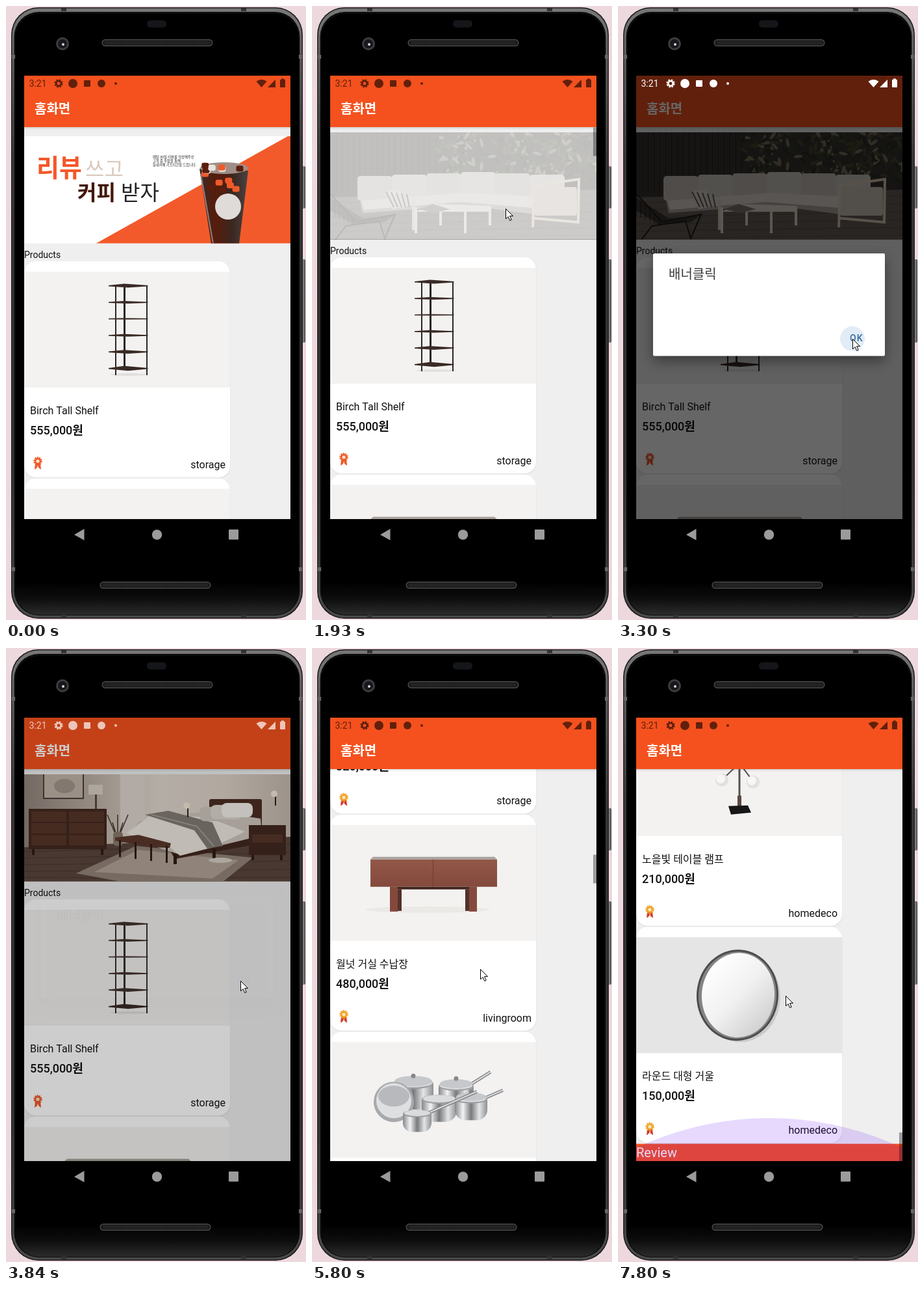
Recreate the animation shown at these times as an HTML page with a canvas. Size 462 by 943 pixels, loop 8 s.

```html
<!DOCTYPE html>
<html lang="ko">
<head>
<meta charset="utf-8">
<style>
html, body { margin: 0; width: 100%; height: 100%; overflow: hidden; background: #ecd8dd; }
canvas { display: block; }
</style>
</head>
<body>
<canvas id="stage" width="462" height="943"></canvas>
<script>
const c = document.getElementById('stage').getContext('2d');
const FONT = 'Roboto, "Noto Sans CJK KR", "Noto Sans CJK", sans-serif';
const LOOP = 8000, ORANGE = '#f4511e', PAGE = '#efefef', PITCH = 333.4, LINE = 19;

// ---- drawing helpers
function rect(x, y, w, h, color, radius = 0) {
  c.fillStyle = color;
  c.beginPath();
  c.roundRect(x, y, w, h, radius);
  c.fill();
}
function oval(x, y, rx, ry, color, angle = 0) {
  c.fillStyle = color;
  c.beginPath();
  c.ellipse(x, y, rx, ry, angle, 0, 7);
  c.fill();
}
const disc = (x, y, r, color) => oval(x, y, r, r, color);
function ring(x, y, r, width, color, dash = []) {
  c.strokeStyle = color;
  c.lineWidth = width;
  c.setLineDash(dash);
  c.beginPath();
  c.arc(x, y, r, 0, 2 * Math.PI);
  c.stroke();
  c.setLineDash([]);
}
function trace(pts) {
  c.beginPath();
  for (let i = 0; i < pts.length; i += 2) c.lineTo(pts[i], pts[i + 1]);
}
function poly(color, ...pts) { trace(pts); c.fillStyle = color; c.fill(); }
function line(color, width, ...pts) {
  trace(pts);
  c.strokeStyle = color;
  c.lineWidth = width;
  c.stroke();
}
function text(str, x, y, size, color = '#111', weight = 400, align = 'left') {
  c.font = `${weight} ${size}px ${FONT}`;
  c.textAlign = align;
  c.fillStyle = color;
  c.fillText(str, x, y);
  return c.measureText(str).width;
}
function fade(x0, y0, x1, y1, ...colors) {
  const g = c.createLinearGradient(x0, y0, x1, y1);
  colors.forEach((col, i) => g.addColorStop(i / (colors.length - 1), col));
  return g;
}
function group(x, y, draw) { c.save(); c.translate(x, y); draw(); c.restore(); }
function clip(x, y, w, h) { c.beginPath(); c.rect(x, y, w, h); c.clip(); }
function repeat(n, draw) { for (let i = 0; i < n; i++) draw(i); }
const noise = i => Math.abs(Math.sin(i * 12.9898) * 43758.5453) % 1;

// ---- motion
const ramp = (t, a, b) => Math.min(1, Math.max(0, (t - a) / (b - a)));
const ease = (t, a, b) => { const k = ramp(t, a, b); return k * k * (3 - 2 * k); };

// The list repaints only now and then: a short drag, then one long fling.
const REPAINTS = [0, 1930, 4740, 4920, 5270, 5470, 5670, 5800, 6070];
const MAX_SCROLL = 7651, NUDGE = 6, DRAG = 134;
function scrollAt(time) {
  const t = time < 6400 ? REPAINTS.findLast(start => start <= time) : time - time % 200;
  const drag = 1 - Math.exp(-Math.max(0, t - 4690) / 160);
  const left = 1 - ramp(t, 5560, 7600);
  return (t >= 1930) * NUDGE + DRAG * drag + (MAX_SCROLL - NUDGE - DRAG) * (1 - left * left);
}
const MOVES = [[700, 1400, -150, -620], [2450, 3020, 63, 200], [4120, 4320, -102, -18], [7200, 7500, -1, 41]];
function cursorAt(t) {
  return MOVES.reduce(([x, y], [a, b, dx, dy]) => {
    const k = ease(t, a, b);
    return [x + dx * k, y + dy * k];
  }, [448, 931]);
}

// ---- banner pages, each 410 x 165
function coffeePage() {
  rect(0, 0, 410, 165, '#fff');
  poly('#f35a2b', 110, 165, 406, 0, 410, 0, 410, 165);
  text('리뷰', 19, 62, 38, '#f4582a', 800);
  text('쓰고', 94, 62, 32, '#dac9bd', 300);
  text('커피', 82, 98, 32, '#43180a', 800);
  text('받자', 149, 98, 32, '#222', 300);
  ['매달 30일 리뷰를 작성해주신', '고객 중 추첨을 통해', '동네카페 기프티콘을 드립니다.']
    .forEach((s, i) => text(s, 198, 34 + i * 6.2, 5.3, '#222'));
  poly(fade(270, 0, 345, 0, '#3a2a26', '#571c0b', '#3b2620', '#4a4340'), 270, 50, 345, 53, 331, 165, 288, 165);
  oval(308, 49, 37, 9, '#a08e86');
  repeat(16, i => {
    const x = 273 + noise(i) * 58, y = 40 + noise(i + 50) * 45;
    rect(x, y, 11, 9, ['#ee5a2a', '#5a1d0e', '#eae2de'][y > 55 ? i % 2 : i % 3], 3);
  });
  line('#8d7f79', 2, 272, 58, 291, 165);
  disc(314, 108, 20, '#dedbd8');
}

function sofaPage() {
  rect(0, 0, 410, 165, '#37332f');
  repeat(19, i => rect(i * 9, 0, 1, 92, '#24211e'));
  repeat(220, i => oval(165 + noise(i) * 245, noise(i + 300) * 75, 7, 2.5,
    ['#2a2d22', '#46462f', '#343a2a', '#77705a'][i % 4], i));
  poly('#665e56', 0, 100, 410, 88, 410, 165, 0, 165);
  repeat(6, i => line('#524b44', 1, 0, 108 + i * 11, 410, 98 + i * 12));
  poly('#aaa39b', 45, 100, 215, 88, 330, 94, 330, 128, 210, 112, 50, 124);
  repeat(6, i => rect(42 + i * 53, 61 + Math.abs(i - 3) * 2, 54, 38, i % 2 ? '#cfc8c0' : '#c6bfb7', 5));
  poly('#ddd6ce', 48, 105, 205, 93, 325, 99, 325, 117, 200, 107, 52, 119);
  rect(314, 84, 66, 44, '#cfc5b9', 4);
  line('#dccbb6', 4, 312, 146, 314, 82, 383, 72, 382, 138, 314, 132);
  rect(126, 104, 4, 46, '#dccbb6');
  poly('#d9d2ca', 84, 90, 106, 88, 128, 112, 96, 118);
  repeat(5, i => line('#5c554e', 2, 86 + i * 8, 91 + i, 98 + i * 6, 115));
  poly('#e2dbd1', 130, 122, 160, 110, 248, 113, 246, 122);
  repeat(4, i => rect(130 + i * 38, 115, 4, i % 2 ? 28 : 40, '#e2dbd1'));
  poly('#7d746b', 136, 118, 158, 110, 184, 118, 160, 124);
  poly('#3a3530', 0, 100, 50, 132, 98, 128, 84, 138, 36, 142, 0, 120);
  line('#1c1917', 2, 0, 94, 40, 138, 100, 126, 84, 163, 76, 136, 24, 144, 8, 165);
  repeat(6, i => line('#1c1917', 1, i * 7, 99 + i * 6, i * 7, 128 + i * 3));
}

function bedPage() {
  const wood = '#42291f', dark = '#2e1c15';
  rect(0, 0, 410, 165, fade(0, 0, 410, 0, '#8f837a', '#b9ada3', '#e0d7ce', '#dcd1c7', '#c3b7ac'));
  rect(148, 0, 38, 100, '#ddd5cd');
  poly('#59463d', 0, 112, 410, 96, 410, 165, 0, 165);
  repeat(5, i => line('#483730', 1, 0, 119 + i * 10, 410, 107 + i * 13));
  poly('#948579', 80, 152, 172, 110, 352, 128, 306, 165, 150, 165);
  poly('#b3a497', 108, 150, 176, 116, 330, 132, 290, 160);
  rect(29, -4, 63, 42, '#4b4038');
  rect(31, -4, 59, 40, '#bfb3a7');
  oval(62, 18, 16, 11, '#a2958a');
  rect(99, 16, 22, 15, '#d8cfc4');
  rect(109, 31, 3, 22, '#5c4a3f');
  rect(7, 53, 120, 62, wood);
  repeat(6, i => rect(11 + i % 2 * 58, 57 + (i >> 1) * 18, 54, 16, '#573629'));
  repeat(2, i => rect(12 + i * 106, 115, 4, 9, dark));
  repeat(5, i => line('#3e3229', 1.5, 144, 100, 128 + i * 8, 62 + i % 2 * 12));
  rect(137, 88, 15, 22, '#8a7b6d', 5);
  rect(285, 38, 81, 62, '#4c2e23', 3);
  poly(wood, 225, 118, 366, 92, 366, 106, 232, 130);
  repeat(3, i => rect(230 + i * 60, 122 - i * 8, 5, 16, dark));
  poly('#d0c7be', 176, 72, 285, 56, 364, 68, 366, 94, 242, 124, 160, 98);
  poly('#efe8e0', 158, 90, 196, 62, 282, 66, 340, 88, 290, 112, 240, 125, 222, 110, 190, 108);
  poly('#847c76', 186, 62, 222, 56, 290, 74, 306, 110, 282, 114, 262, 86);
  line('#a59c95', 2, 196, 62, 266, 80, 292, 110);
  repeat(3, i => rect(270 + i * 17, 50 - i * 3, 48, 22, ['#cfc7bf', '#ded7cf', '#f3eee8'][i], 8));
  poly('#5b382b', 140, 97, 176, 93, 226, 106, 224, 113, 196, 112, 140, 102);
  repeat(4, i => rect(146 + i * 24, 101 + i * 3, 3, 26, dark));
  rect(346, 78, 57, 46, wood);
  rect(351, 92, 47, 13, '#56362a');
  repeat(2, i => {
    rect(350 + i * 44, 124, 4, 8, dark);
    const x = 252 + i * 135, y = 48 - i * 18;
    line('#2d241f', 2, x, y + 18, x, y);
    disc(x - 2, y, 5, '#f2e7d6');
  });
  oval(302, 132, 18, 4, '#d6cec6');
}

// ---- product pictures, in card coordinates
function shelf() {
  oval(163, 174, 30, 2, '#e2e0dd');
  [141, 154, 189].forEach((x, i) => rect(x - 1, 37, i === 1 ? 3 : 2, i === 1 ? 130 : 138, '#2b2726'));
  repeat(6, i => {
    const y = 37 + i * 25.4, depth = 0.6 + Math.abs(i - 2) * 0.9;
    poly('#3a2a25', 130, y, 154, y - depth, 191, y, 190, y + 1.5, 160, y + depth + 1, 130, y + 1.5);
  });
}
function sideboard() {
  oval(150, 146, 96, 5, '#ebe9e6');
  rect(92, 111, 134, 4, '#3f2620');
  repeat(2, i => {
    rect(92 + i * 122, 111, 12, 38, '#84493d');
    rect(i ? 208 : 104, 115, 6, 33, '#54312a');
  });
  rect(62, 69, 195, 42, fade(0, 69, 0, 111, '#935748', '#834a3d'));
  poly('#a9a19b', 62, 69, 66, 65, 253, 65, 257, 69);
  rect(158, 69, 1, 42, '#6f3c31');
}
function pot(x, y, w, lid, handle) {
  if (handle) {
    line('#85878a', 5, x + w / 3, y, ...handle);
    line('#dcdee0', 2, x + w / 3, y, ...handle);
  }
  const h = w * 0.64;
  rect(x - w / 2, y, w, h, fade(x - w / 2, 0, x + w / 2, 0, '#85878a', '#f3f3f4', '#77797c', '#e4e5e6', '#8d8f92'), [2, 2, h / 2, h / 2]);
  oval(x, y, w / 2, h / 5, '#9b9da0');
  oval(x, y - 1, w / 2 - 2, h / 6, '#d9dbdd');
  if (lid) {
    oval(x, y - 4, w / 2 - 2, h / 5, '#c6c8cb');
    disc(x, y - 12, 3.5, '#85878a');
  }
}
function pots() {
  pot(128, 80, 62, true);
  pot(194, 84, 54, true, [247, 62]);
  pot(168, 104, 54);
  pot(217, 104, 50, true, [266, 90]);
  disc(98, 108, 31, '#a7a9ac');
  disc(98, 106, 27, '#dddfe0');
  oval(98, 99, 24, 16, '#b7b9bc');
  pot(134, 126, 44, false, [226, 92]);
}
function rug() {
  c.save();
  clip(69, 78, 180, 53);
  rect(69, 78, 180, 53, '#2f3c55');
  repeat(15, k => [-26, 26].forEach(amp => {
    const pts = [];
    repeat(7, i => pts.push(24 + i * 45, 104 + (i % 2 ? amp : -amp) + (k - 7) * 6.5));
    if (k % 3 !== 1) line('#b9b29f', 1.3, ...pts);
  }));
  c.restore();
}
function lamp() {
  line('#55514f', 3, 159, 50, 159, 147);
  line('#55514f', 2, 132, 108, 159, 82, 180, 110);
  rect(156, 132, 6, 18, '#5c4744');
  [[132, 108], [180, 111], [159, 62]].forEach(([x, y]) => {
    disc(x, y, 10, '#e2e0de');
    disc(x - 2, y - 2, 7, '#f7f6f4');
  });
  poly('#171717', 142, 148, 172, 147, 177, 158, 146, 161);
}
function mirror() {
  oval(160, 108, 62, 69, '#cacaca');
  oval(156, 105, 63, 70, '#4d4b4b', 0.08);
  oval(156, 105, 60, 67, '#868383', 0.08);
  oval(157, 105, 56, 65, fade(110, 60, 205, 150, '#fff', '#f1f1f1', '#cfcfcf'), 0.08);
}

// ---- product list
const CATEGORIES = ['storage', 'livingroom', 'bedroom', 'kitchen', 'homedeco'];
const SAMPLES = [
  { name: '원목 수납 선반', price: '320,000', draw: shelf },
  { name: '월넛 거실 수납장', price: '480,000', draw: sideboard },
  { name: '스틸 냄비 세트', price: '98,000', draw: pots },
  { name: '패턴 러그', price: '130,000', draw: rug }];
const FEATURED = {
  0: { name: 'Birch Tall Shelf', price: '555,000' },
  19: { name: '달빛부엌살림 6 Piece 스테인리스 스틸 냄비\nSet"', price: '120,000', draw: pots, bg: '#fff' },
  20: { name: '패턴 러그', price: '130,000', draw: rug },
  22: { name: '노을빛 테이블 램프', price: '210,000', draw: lamp },
  23: { name: '라운드 대형 거울', price: '150,000', draw: mirror, bg: '#e5e5e5' }
};
const products = Array.from({ length: 24 }, (_, i) => {
  const item = { bg: '#f3f2f0', category: CATEGORIES[Math.floor(i / 5)], ...SAMPLES[i % 4], ...FEATURED[i] };
  item.lines = item.name.split('\n');
  item.extra = (item.lines.length - 1) * LINE;
  return item;
});

function award(x, y, head, ribbon) {
  poly(ribbon, x - 4, y, x - 5, y + 10, x - 1, y + 7, x, y + 3, x + 1, y + 7, x + 5, y + 10, x + 4, y);
  ring(x, y - 3, 5.5, 2.5, head, [2.2, 1.2]);
  disc(x, y - 3, 5, head);
  disc(x, y - 3, 2.6, '#fbe3c4');
}
function card({ lines, extra, price, draw, bg, category }, i) {
  rect(0, 0.5, 317.5, 333 + extra, '#e1e1e1', 18);
  rect(0, 0, 317, 332 + extra, '#fff', 18);
  rect(0, 16, 317, 178, bg);
  draw();
  lines.forEach((s, n) => text(s, 9, 235 + n * 19.5, 16));
  const width = text(price, 9, 266 + extra, 18, '#111', 500);
  text('원', 9 + width, 266 + extra, 18, '#111', 700);
  award(21, 310 + extra, i < 2 ? '#ef5a2b' : '#f0a222', i < 2 ? '#ef5a2b' : '#cf3a2c');
  text(category, 310, 318 + extra, 16, '#111', 400, 'right');
}

// ---- screen
function banner(t) {
  clip(28, 200, 410, 164.5);
  const offset = 410 * (ease(t, 640, 980) + ease(t, 3650, 3830));
  [coffeePage, sofaPage, bedPage].forEach((page, i) => {
    const x = i * 410 - offset;
    if (Math.abs(x) < 410) group(28 + x, 200, page);
  });
  c.globalAlpha = 0.75 * ramp(t, 1500, 1700) * (1 - ramp(t, 2150, 2400));
  rect(28, 200, 410, 165, PAGE);
}
function content(t, scroll) {
  rect(28, 186, 410, 602, PAGE);
  group(0, -scroll, () => {
    if (scroll < 200) group(0, 0, () => banner(t));
    text('Products', 28, 387, 14);
    let y = 392;
    products.forEach((item, i) => {
      if (y - scroll > -200 && y - scroll < 790) group(28, y, () => card(item, i));
      y += PITCH + item.extra;
    });
    rect(28, y, 410, 40, ORANGE);
    text('Review', 28, y + 20.5, 20, '#fff');
  });
  const bar = ramp(t, 1900, 1930) * (1 - ramp(t, 2150, 2400)) + ramp(t, 4700, 4740);
  const view = 602 / (MAX_SCROLL + 602);
  rect(433, 186 + scroll * view, 5, 602 * view, `rgba(0,0,0,${0.35 * bar})`);
  const glow = ramp(t, 7560, 7800);
  if (glow) disc(233, 1204 + 66 * (1 - glow), 482, `rgba(98,0,238,${0.15 * glow})`);
}

function dialog(alpha, ripple) {
  c.globalAlpha = alpha;
  c.shadowColor = 'rgba(0,0,0,.4)';
  c.shadowBlur = 20;
  c.shadowOffsetY = 8;
  rect(54, 380, 357, 157.5, '#fff', 2);
  c.shadowColor = 'transparent';
  text('배너클릭', 78, 419, 20, '#3a3a3a');
  disc(361, 511, 19 * ripple, '#e1ecf6');
  c.letterSpacing = '1px';
  text('OK', 357, 515, 14, '#3a6c9c', 500);
}

function statusBar(color) {
  text('3:21', 35.5, 124, 14, color);
  ring(81, 119, 3.7, 2.6, color);
  ring(81, 119, 5.6, 2, color, [2.6, 1.8]);
  disc(103, 119, 7, color);
  rect(120, 114, 10, 10, color, 1);
  disc(147, 119, 6, color);
  disc(169, 119, 2, color);
  c.beginPath();
  c.moveTo(393.5, 125);
  c.arc(393.5, 125, 12, -2.3, -0.84);
  c.fill();
  poly(color, 403, 125, 415, 113, 415, 125);
  rect(422, 113, 8, 12, color, 1);
  rect(424, 111.5, 4, 1.5, color);
}

function phone() {
  rect(0, 0, 462, 943, '#ecd8dd');
  [[246, 65], [389, 128]].forEach(([y, h]) => rect(454, y, 7, h, fade(454, 0, 461, 0, '#333', '#8b8789', '#444'), 2));
  rect(8, 2, 449, 939, '#1b1b1b', 42);
  rect(9.5, 3.5, 446, 936, fade(0, 3, 0, 940, '#777', '#3d3d3d', '#383838', '#383838', '#4a4a4a'), 41);
  rect(12.5, 9, 440, 927, '#0c0c0c', 38);
  rect(14.5, 12, 436, 923, fade(0, 885, 0, 935, '#000', '#0d0d0d', '#2c2c2c'), 37);
  repeat(2, i => {
    repeat(2, j => {
      rect(9 + j * 442, 75 + i * 787, 5, 6, '#666');
      rect(85 + j * 277, 3 + i * 932, 8, 5, '#333');
    });
    const x = 147.5 - i * 3, y = 51 + i * 833;
    rect(x, y, 171, 11, '#494949', 5.5);
    rect(x + 1.5, y + 1.5, 168, 8, '#1a1a1a', 4);
    repeat(54, k => rect(x + 6 + k * 3, y + 3, 1, 5, '#343434'));
  });
  rect(217, 22, 30, 11, '#15161a', 5);
  disc(87, 58, 10, '#3c3d40');
  disc(87, 58, 7, '#17181b');
  disc(88, 59, 2, '#d8d8d8');
  poly('#9b9b9b', 105, 812, 120.5, 803, 120.5, 820.5);
  disc(232.5, 812, 7.7, '#9b9b9b');
  rect(343, 804, 15, 15.5, '#9b9b9b', 1);
}

function cursor() {
  const arrow = [0.5, 0.5, 0.5, 16, 4, 12.5, 6.7, 18.5, 9.2, 17.4, 6.6, 11.6, 11.5, 11.6, 0.5, 0.5];
  poly('#fff', ...arrow);
  line('#000', 1, ...arrow);
}

function draw(t) {
  phone();
  const dim = ramp(t, 2190, 2400) * (1 - ramp(t, 3640, 3940));
  group(0, 0, () => {
    clip(28, 107, 410, 681);
    content(t, scrollAt(t));
    rect(28, 186, 410, 4, fade(0, 186, 0, 190, 'rgba(0,0,0,.12)', 'rgba(0,0,0,0)'));
    rect(28, 107, 410, 79, ORANGE);
    text('홈화면', 44, 165, 20, '#fff', 700);
    if (dim) {
      rect(28, 107, 410, 681, `rgba(0,0,0,${0.6 * dim})`);
      group(0, 0, () => dialog(dim ** 3, ease(t, 3080, 3280) * (1 - ramp(t, 3640, 3800))));
    }
    statusBar(dim ? `rgba(255,255,255,${0.55 + 0.45 * dim})` : 'rgba(0,0,0,.6)');
  });
  if (t >= MOVES[0][0]) group(...cursorAt(t), cursor);
}

function tick() {
  draw(performance.now() % LOOP);
  requestAnimationFrame(tick);
}
tick();
</script>
</body>
</html>
```
